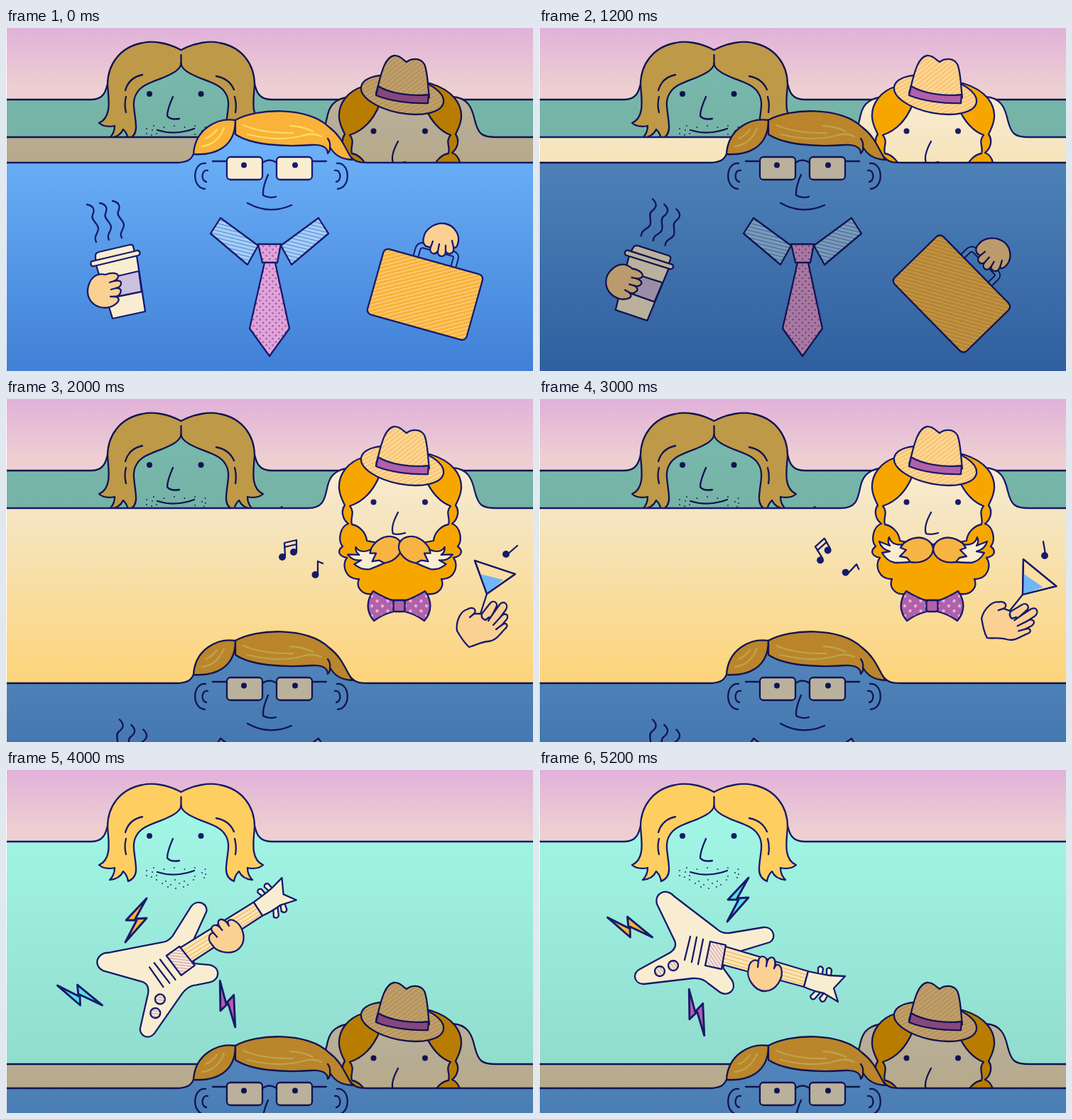
Recreate the animation shown at these times as an HTML page. Size 742 by 484 pixels, loop 5400 ms.

```html
<!DOCTYPE html>
<html lang="en">
<head>
<meta charset="utf-8">
<title>Three neighbours</title>
<style>
html, body { margin: 0; width: 100%; height: 100%; overflow: hidden; background: #fff; }
svg { display: block; width: 742px; height: 484px; }
.ink { stroke: #171a6b; stroke-width: 2.3; stroke-linejoin: round; stroke-linecap: round; }
.line { fill: none; }
.eye { fill: #171a6b; stroke: none; }
.skin { fill: #fbd093; }
.cream { fill: #f9edd1; }
.bold { stroke-width: 2.9; }
.dim { filter: brightness(.745); }
</style>
</head>
<body>
<svg viewBox="0 0 742 484">
<defs>
  <linearGradient id="sky" x2="0" y2="1"><stop stop-color="#e1b1da"/><stop offset=".65" stop-color="#edcfd2"/><stop offset="1" stop-color="#eed1d0"/></linearGradient>
  <linearGradient id="mint" gradientUnits="userSpaceOnUse" x1="0" y1="80" x2="0" y2="430"><stop stop-color="#a1f5e5"/><stop offset="1" stop-color="#90dbcd"/></linearGradient>
  <linearGradient id="sand" gradientUnits="userSpaceOnUse" x1="0" y1="100" x2="0" y2="400"><stop stop-color="#faeccf"/><stop offset=".18" stop-color="#f5e6c4"/><stop offset="1" stop-color="#fdd47a"/></linearGradient>
  <linearGradient id="blue" gradientUnits="userSpaceOnUse" x1="0" y1="170" x2="0" y2="484"><stop stop-color="#6bb0f8"/><stop offset="1" stop-color="#4080d6"/></linearGradient>
  <pattern id="hatHatch" width="5" height="5" patternUnits="userSpaceOnUse" patternTransform="rotate(-38)"><path fill="#fdd592" d="M0 0h5v5H0z"/><path fill="#f3b45c" d="M0 0h5v1H0z"/></pattern>
  <pattern id="caseHatch" width="5" height="5" patternUnits="userSpaceOnUse" patternTransform="rotate(-30)"><path fill="#f9b23c" d="M0 0h5v5H0z"/><path fill="#fdd58b" d="M0 0h5v1.3H0z"/></pattern>
  <pattern id="collarHatch" width="5" height="5" patternUnits="userSpaceOnUse" patternTransform="rotate(14)"><path fill="#a3cffa" d="M0 0h5v5H0z"/><path fill="#5a83c6" d="M0 0h5v1H0z"/></pattern>
  <pattern id="pickHatch" width="4" height="4" patternUnits="userSpaceOnUse" patternTransform="rotate(55)"><path fill="#f7e6d4" d="M0 0h4v4H0z"/><path fill="#c998a8" d="M0 0h4v1H0z"/></pattern>
  <pattern id="tieDots" width="9" height="9" patternUnits="userSpaceOnUse"><path fill="#e0a3da" d="M0 0h9v9H0z"/><g fill="#a459a5"><circle cx="2" cy="2" r="1.3"/><circle cx="6.5" cy="6.5" r="1.3"/></g></pattern>
  <pattern id="bowDots" width="15" height="14" patternUnits="userSpaceOnUse" patternTransform="translate(511 274)"><path fill="#b062a9" d="M0 0h15v14H0z"/><g fill="#e6aedd"><circle cx="4" cy="4" r="2.2"/><circle cx="11.5" cy="11" r="2.2"/></g></pattern>
  <path id="bolt" d="M15-31-14 0 1 0-15 31 15-3-1-2Z"/>
  <path id="lock" fill="#ffce61" d="M246.5 31C226 20 206 18 192 21C160 27 143 52 143 80C144 98 150 126 131 134Q139 141 153 138Q153 148 146 155Q160 154 165 143Q171 149 172 157Q184 152 183 138C182 118 176 105 184 92C192 78 212 75 228 67Q246 59 246.5 50"/>
  <g id="ear" class="line"><path d="M281 191C262 189 261 226 280 227M284 201C275 199 274 216 282 217"/></g>
  <g id="whisker">
    <path fill="#faecd0" d="M516 205C504 207 495 204 493 195Q490 202 494 207L479 201Q482 212 494 215L483 217Q490 229 501 231Q512 231 523 230Z"/>
    <path fill="#f8b443" d="M555 211C553 199 540 194 530 196Q522 197 513 204L509 210 517 213 508 222 518 224 523 230C540 233 555 224 555 211Z"/>
  </g>
  <path id="wing" d="M546 285C535 281 525 276 517 271C507 285 507 300 518 313C525 308 537 302 546 300Z"/>
</defs>

<rect width="742" height="130" fill="url(#sky)"/>

<g id="mintLayer" class="ink">
  <path fill="url(#mint)" d="M-5 101H120C137 101 141 90 144 74L246 40 349 74C352 90 356 101 374 101H750V900H-5Z"/>
  <use href="#lock"/><use href="#lock" transform="translate(493) scale(-1 1)"/>
  <path class="line" d="M192 66Q173 70 168 88M169 97Q166 108 169 119M296 68Q314 71 321 87M322 97Q325 108 323 119"/>
  <path class="line" d="M246.5 38V50M235 97Q227 115 227 124Q231 130 244 128M213 144Q238 152 265 142"/>
  <g class="eye"><circle cx="202" cy="93" r="4"/><circle cx="274.500" cy="93" r="4"/><g id="stubble"></g></g>
  <g id="guitar">
    <path class="cream" d="M166 189C162 173 180 166 190 178L250 224Q257 231 268 230L316 222C330 221 335 237 325 243L266 261 259 279 272 297C279 311 265 321 254 313L238 301Q230 293 216 294L148 302C133 302 131 286 142 281L184 258Q195 251 191 241Z"/>
    <path class="line" d="M213 235 205 268M222 236 215 271M231 239 224 274"/>
    <path fill="#fbe5b8" d="M262 249 379 284 373 306 256 274Z"/>
    <path class="line" d="M261 255 377 289M260 260 376 294M258 265 375 299M257 270 374 303" style="stroke:#f1b04f;stroke-width:1.1"/>
    <path fill="url(#pickHatch)" d="M241 242 263 247 257 281 234 276Z"/>
    <g fill="url(#pickHatch)"><circle cx="170" cy="284" r="7"/><circle cx="189" cy="276" r="7"/></g>
    <path class="cream" d="M393 287 393 279Q397 275 400 280L399 287M405 289 405 281Q409 277 412 282L411 291M388 313 382 319Q383 325 388 323L395 315M401 315 395 322Q397 329 402 326L407 317"/>
    <path class="cream" d="M379 284Q396 288 410 290L431 291 415 308 421 327 401 315Q386 312 373 306Z"/>
    <path class="skin" d="M295 281C291 291 302 312 318 312C334 312 345 293 341 280C339 274 334 273 332 278C335 261 323 261 321 272C321 260 309 261 309 270C303 266 296 270 295 281Z"/>
    <path class="line" d="M309 270 308 278M321 270 320 277M333 273 331 280"/>
  </g>
  <g class="bold">
    <use id="boltA" href="#bolt" fill="#f8b13c"/>
    <use id="boltB" href="#bolt" fill="#55e0e2"/>
    <use id="boltC" href="#bolt" fill="#b35eae"/>
  </g>
</g>

<g id="sandLayer" class="ink">
  <path fill="url(#sand)" d="M-5 154H425C449 154 449 138 453 122C457 105 468 99 485 97H628C650 98 656 112 660 130C665 150 670 154 690 154H750V900H-5Z"/>
  <path fill="#f7a600" d="M505 82C480 88 468 108 469 126C470 138 475 145 477 150C471 158 474 170 482 176C470 180 467 200 474 208C466 214 468 222 480 224C472 234 478 255 497 254C492 266 502 277 516 275C530 287 580 287 594 275C608 277 618 266 613 254C632 255 638 234 630 224C642 222 644 214 636 208C643 200 640 180 628 176C636 170 639 158 633 150C635 145 640 138 641 126C642 108 630 88 597 78Z"/>
  <path fill="url(#sand)" d="M526 108Q512 142 484 151C492 160 484 168 487 177C497 179 507 188 508 200Q555 210 602 200C603 188 613 179 623 177C626 168 618 160 626 151Q604 143 590 112Z"/>
  <g class="eye"><circle cx="517.500" cy="145.500" r="4"/><circle cx="590" cy="145.500" r="4"/></g>
  <path class="line" d="M552 160Q541 180 545 190Q552 192 562 189"/>
  <use id="whiskerL" href="#whisker"/><use id="whiskerR" href="#whisker"/>
  <g fill="url(#bowDots)"><use href="#wing"/><use href="#wing" transform="translate(1107) scale(-1 1)"/></g>
  <rect x="545.500" y="284" width="16" height="16" rx="3" fill="#b062a9"/>
  <g fill="url(#hatHatch)">
    <ellipse cx="558" cy="94" rx="59" ry="26" transform="rotate(11 558 94)"/>
    <path d="M521 92C527 72 531 42 546 39C555 38 560 46 564 48C570 43 583 41 589 51C594 62 594 85 596 98Q560 105 521 92Z"/>
  </g>
  <path fill="#b25fa9" d="M524 82C540 92 570 97 595 94L594 106C570 107 540 103 521 95Z"/>
  <g id="drink">
    <path class="line" d="M677 275 668 303"/>
    <path fill="#fcdda2" d="M660 228 717 247 677 275Z"/>
    <path fill="#70b5fa" stroke="none" d="M667 247 700 255 677 275Z"/>
    <path class="line" d="M660 228 717 247 677 275Z"/>
    <path class="skin" d="M635 327C633 312 641 299 649 297C657 292 664 297 659 303L670 303 681 289C686 282 694 288 690 294L685 304 695 290C701 283 708 290 704 297L696 308C702 300 709 304 705 311L698 319C704 314 709 319 702 325C695 332 690 341 679 342C667 343 661 348 652 350Q644 343 635 327Z"/>
    <path class="line" d="M670 303Q668 309 675 312L680 308M685 304 679 313M696 308 686 319M698 319 690 325M659 303 653 308"/>
  </g>
  <g id="pair"><path class="line" d="M393 222 392 203 409 199V215M392 209 409 205"/><circle class="eye" cx="389" cy="223" r="5"/><circle class="eye" cx="405" cy="216" r="5"/></g>
  <g id="note"><path class="line" d="M439 247V229L446 232"/><circle class="eye" cx="435.500" cy="248" r="5"/></g>
  <g id="stem"><path class="line" d="M705 220 720 207"/><circle class="eye" cx="704" cy="219" r="5"/></g>
</g>

<g id="blueLayer" class="ink">
  <path fill="url(#blue)" d="M-5 190H240C256 190 262 185 265 175L323 130 455 140 484 180C491 189 497 190 510 190H750V900H-5Z"/>
  <g fill="#f9b23a">
    <path d="M323 130C298 126 266 142 264 178C292 180 323 170 323 130Z"/>
    <path d="M323 130C352 113 425 110 455 140C474 154 478 172 488 186C470 185 462 178 456 168Q457 173 453 177C453 168 444 164 430 165C390 168 345 165 323 150Z"/>
  </g>
  <path class="line" d="M453 156Q457 161 456 168"/>
  <path class="line" style="stroke:#ffdc63" d="M276 167Q298 164 307 141M281 156Q291 152 297 143M334 137Q362 149 404 148M340 150Q385 161 417 152Q432 147 444 153M400 138Q419 139 432 146"/>
  <use href="#ear"/><use href="#ear" transform="translate(747) scale(-1 1)"/>
  <path class="line" d="M291 188H311M431 188H451M361 190Q371 183 381 190M369 207Q361 225 362 236Q370 241 380 238M340 247Q370 264 402 250"/>
  <g class="cream"><rect x="311" y="182" width="50" height="32" rx="5"/><rect x="381" y="182" width="50" height="32" rx="5"/></g>
  <g class="eye"><circle cx="335" cy="193.500" r="4"/><circle cx="407" cy="193.500" r="4"/></g>
  <path fill="url(#collarHatch)" d="M302 268 355 307 340 334 288 290ZM440 268 454 290 402 334 387 307Z"/>
  <path fill="url(#tieDots)" d="M364 331H379L399 424 371 463 343 424ZM355 305H387L382 331H361Z"/>
  <g id="coffee">
    <path class="line" d="M114 249C124 251 125 257 122 264S130 276 130 283 123 293 127 302M132 247C142 249 143 255 140 262S148 274 148 281 141 291 145 299M150 244C160 246 161 252 158 259S166 271 166 278 159 288 163 296"/>
    <path class="cream" d="M127 335 184 321 196 400 150 410Z"/>
    <path fill="#cdbfdf" d="M132 356 187 343 191 372 142 382Z"/>
    <path class="cream" d="M126 328 126 320Q127 317 131 316L174 306Q178 305 179 308L181 316Z"/>
    <path class="cream" d="M122 329 185 314Q188 314 188.500 317T186 321L124 336Q120 337 119.500 333T122 329Z"/>
    <path class="skin" d="M140 348C150 344 159 346 158 351Q157 355 152 357Q163 355 162 361Q161 366 155 367Q164 367 161 374Q159 379 153 379Q162 381 157 387C151 394 141 396 133 394C121 391 114 381 115 369C117 354 126 345 140 348Z"/>
    <path class="line" d="M152 357 146 359M155 367 148 369M153 379 147 379"/>
  </g>
  <g id="briefcase">
    <path class="line" d="M-27-50V-60Q-26-66-20-66H22Q28-66 28-60V-50" style="stroke-width:9"/>
    <path class="line" d="M-27-49V-60Q-26-66-20-66H22Q28-66 28-60V-49" style="stroke:#62a5ef;stroke-width:5"/>
    <rect x="-72.500" y="-48" width="145" height="96" rx="7" fill="url(#caseHatch)"/>
    <g transform="rotate(-15.6) translate(-590 -376)">
      <path class="skin" d="M588 296C590 283 605 274 618 276C633 279 640 294 636 305C635 310 631 311 630 309C632 319 622 321 619 315C619 325 607 324 608 315C603 322 595 317 598 309C590 310 586 304 588 296Z"/>
      <path class="line" d="M598 309 601 301M608 315 610 305M619 315 619 307M630 309 628 300"/>
    </g>
  </g>
</g>
<rect width="1" height="484" fill="#fff"/>
</svg>
<script>
const STEP = 200, LOOP = 5400;
const el = id => document.getElementById(id);
const place = (id, transform) => el(id).setAttribute('transform', transform);
const clamp = (v, max) => Math.max(0, Math.min(v, max));
// Turn a part about (x, y), then shift it by (dx, dy).
const turn = (id, on, angle, x, y, dx = 0, dy = 0) =>
  place(id, on ? `translate(${dx} ${dy}) rotate(${angle} ${x} ${y})` : '');
const spot = (id, x, y, angle) => place(id, `translate(${x} ${y}) rotate(${angle})`);

// Stubble rows: y, first x, count, spacing
[[138, 208, 6, 14.5], [142, 198, 2, 8], [145, 276, 2, 5], [149, 198, 3, 7],
 [150, 266, 2, 13], [155, 212, 5, 13], [160, 220, 4, 12], [165, 228, 3, 11]]
  .forEach(([y, x, count, gap]) => {
    for (let i = 0; i < count; i++) {
      el('stubble').innerHTML += `<circle cx="${x + i * gap}" cy="${y + i % 2 * 2}" r=".9"/>`;
    }
  });

function draw(k) {
  const sandY = clamp(92 * (k - 17), 261);
  const blueY = Math.max(clamp(92 * (k - 6), 211), clamp(sandY, 259));
  const active = k < 6 ? 'blue' : k < 17 ? 'sand' : 'mint';
  for (const name of ['mint', 'sand', 'blue']) {
    el(name + 'Layer').classList.toggle('dim', name !== active);
  }
  place('sandLayer', `translate(0 ${sandY})`);
  place('blueLayer', `translate(0 ${blueY})`);

  const swing = Math.min(k, 6) >> 1 & 1;
  turn('coffee', swing, 31, 154, 325, 1, 2);
  place('briefcase', swing ? 'translate(581 375) rotate(45.6)' : 'translate(590 376) rotate(15.6)');

  const sway = clamp(k - 9, 7) >> 1 & 1;
  const droop = sway ? '' : 'translate(0 -8) rotate(-20 555 208)';
  place('whiskerL', droop);
  place('whiskerR', 'translate(1110) scale(-1 1)' + droop);
  turn('drink', sway, 21, 677, 275, 4, 1);
  turn('pair', sway, -29, 399, 211, 0, 1);
  turn('note', sway, 43, 436, 248, -4, -3);
  turn('stem', sway, -59, 704, 219, 8, 2);

  const strum = k > 20 && !((k - 21) >> 1 & 1);
  place('guitar', strum ? '' : 'translate(355 196) rotate(-48.5) translate(-376 -295)');
  if (strum) {
    spot('boltA', 128, 222, -92);
    spot('boltB', 280, 183, 0);
    spot('boltC', 222, 342, -44);
  } else {
    spot('boltA', 183, 212, 0);
    spot('boltB', 104, 318, -92);
    spot('boltC', 312, 330, -44);
  }
}

let last = -1;
function tick() {
  const k = Math.floor(performance.now() % LOOP / STEP);
  if (k !== last) draw(last = k);
  requestAnimationFrame(tick);
}
tick();
</script>
</body>
</html>
```
